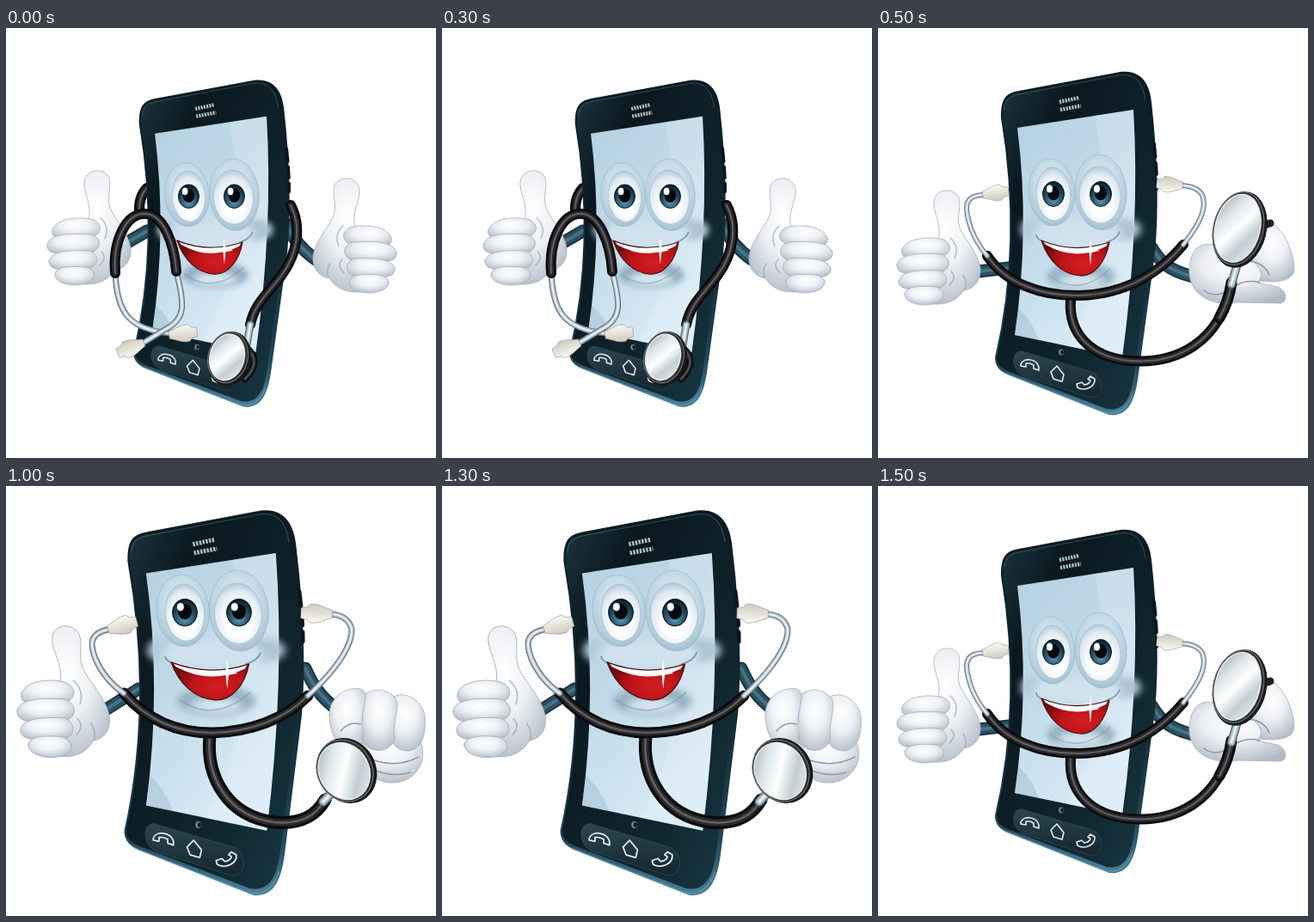
Recreate the animation shown at these times as an HTML page. Size 500x500 px, loop 2 s.

```html
<!DOCTYPE html>
<html lang="en">
<head>
<meta charset="utf-8">
<title>Phone doctor</title>
<style>
html, body { margin: 0; width: 100%; height: 100%; overflow: hidden; background: #fff; }
svg { display: block; width: 100%; height: 100%; }
.pose { display: none; }
.pose.on { display: inline; }
path, ellipse { stroke-linecap: round; stroke-linejoin: round; }
.line { fill: none; }
.grille { fill: none; stroke: #b4bbc0; stroke-width: 4.5; stroke-linecap: butt; stroke-dasharray: 2.2 1.2; }
.glove { fill: url(#glove); stroke: #a7b0bb; stroke-width: .8; }
.crease { fill: none; stroke: #8f9aa8; stroke-width: 1.5; }
</style>
</head>
<body>
<svg id="stage" viewBox="0 0 500 500">
<defs>
  <linearGradient id="body" x1="0" y1="0" x2="1" y2="1">
    <stop offset="0" stop-color="#1d3943"/><stop offset=".25" stop-color="#0a181f"/>
    <stop offset=".7" stop-color="#10262f"/><stop offset="1" stop-color="#193a47"/>
  </linearGradient>
  <linearGradient id="side" x1="0" y1="0" x2="0" y2="1">
    <stop offset="0" stop-color="#0b1a21"/><stop offset=".55" stop-color="#142b35"/>
    <stop offset=".85" stop-color="#214655"/><stop offset="1" stop-color="#4b8198"/>
  </linearGradient>
  <linearGradient id="glass" x1="0" y1="0" x2=".5" y2="1">
    <stop offset="0" stop-color="#b4d0e0"/><stop offset=".45" stop-color="#c0d9e7"/>
    <stop offset="1" stop-color="#d8ebf6"/>
  </linearGradient>
  <linearGradient id="bar" x1="0" y1="0" x2="0" y2="1">
    <stop offset="0" stop-color="#2c4651"/><stop offset="1" stop-color="#14262f"/>
  </linearGradient>
  <radialGradient id="socket" cx=".5" cy=".4" r=".62">
    <stop offset=".5" stop-color="#cadfeb"/><stop offset=".85" stop-color="#b2cbd9"/>
    <stop offset="1" stop-color="#9cb9ca"/>
  </radialGradient>
  <radialGradient id="eye" cx=".5" cy=".62" r=".65">
    <stop offset=".4" stop-color="#fff"/><stop offset=".75" stop-color="#dfebf2"/>
    <stop offset="1" stop-color="#a9c1d0"/>
  </radialGradient>
  <radialGradient id="iris" cx=".5" cy=".75" r=".7">
    <stop offset="0" stop-color="#6098b2"/><stop offset=".55" stop-color="#25526a"/>
    <stop offset="1" stop-color="#0a202c"/>
  </radialGradient>
  <radialGradient id="mouth" cx=".6" cy=".6" r=".55">
    <stop offset="0" stop-color="#d41d22"/><stop offset=".55" stop-color="#bd1418"/>
    <stop offset="1" stop-color="#6b0a0e"/>
  </radialGradient>
  <radialGradient id="glove" cx=".48" cy=".34" r=".72">
    <stop offset="0" stop-color="#fff"/><stop offset=".45" stop-color="#eef1f4"/>
    <stop offset="1" stop-color="#afb9c5"/>
  </radialGradient>
  <linearGradient id="steel" x1="0" y1="0" x2="1" y2="1">
    <stop offset="0" stop-color="#8f9ea6"/><stop offset=".3" stop-color="#dfe7ea"/>
    <stop offset=".5" stop-color="#fff"/><stop offset=".7" stop-color="#c3ced3"/>
    <stop offset="1" stop-color="#eef2f3"/>
  </linearGradient>
  <linearGradient id="tip" x1="0" y1="0" x2="0" y2="1">
    <stop offset="0" stop-color="#fbfaf3"/><stop offset="1" stop-color="#cdcabd"/>
  </linearGradient>
  <filter id="soft" x="-50%" y="-50%" width="200%" height="200%"><feGaussianBlur stdDeviation="4"/></filter>
  <clipPath id="smile"><path d="M190 247Q228 263 269 249C265 272 251 289 235 288C215 287 198 271 190 247Z"/></clipPath>

  <g id="phone">
    <path fill="url(#side)" d="M143 104C143 82 148 76 164 73L282 51C305 48 316 64 318 86Q329 185 322 262L303 402C299 434 291 452 269 450L156 405C141 400 136 393 136 383Q167 250 143 104Z"/>
    <path fill="url(#body)" d="M145 104C145 85 149 79 164 76L280 54C301 51 310 66 312 88Q322 190 317 262L298 402C294 432 286 446 266 443L154 400C141 395 138 391 138 382Q169 250 145 104Z"/>
    <path class="line" stroke="#527c8d" stroke-width="1" opacity=".5" d="M147 94C148 83 153 79 164 77L280 55C300 52 308 64 311 84"/>
    <path class="line" stroke="#6297ad" stroke-width="1.500" d="M147 401L264 447C280 451 290 442 296 426" opacity=".75"/>
    <path class="line" stroke="#0a161c" stroke-width="4" d="M321 135l1.500 15M323 157l.8 13M324 177v10"/>
    <path fill="url(#glass)" d="M162 116L297 95Q305 230 284 383L159 357Q177 235 162 116Z"/>
    <path fill="#fff" opacity=".16" d="M252 102L297 95Q305 230 284 383L220 370Q282 260 252 102Z"/>
    <path fill="#86a7b9" opacity=".3" d="M159 357L163 326Q178 338 187 363Z"/>
    <path class="grille" d="M211 86L234 81M212 95L236 90.500"/>
    <path fill="url(#bar)" stroke="#304c58" stroke-width=".7" d="M168 376L249 400C264 405 264 432 245 429L170 405C154 399 154 374 168 376Z"/>
    <g class="line" stroke="#e2eaed" stroke-width="1.600">
      <path d="M166 391C169 383 184 384 187 394L187 398L181 396V392Q176 389 172 390V394L166 393Z"/>
      <path d="M201 400L208 393L216 403L214 411L204 408Z"/>
      <path d="M247 405L252 408C253 417 241 423 232 418L231 414L237 412L240 415Q246 414 247 410L244 408Z"/>
    </g>
    <ellipse cx="213" cy="377" rx="3" ry="3.500" fill="#6d8894"/>
    <ellipse cx="214" cy="377" rx="1.800" ry="2.500" fill="#0a161c"/>
  </g>

  <g id="face">
    <g filter="url(#soft)">
      <ellipse cx="284" cy="234" rx="22" ry="13" fill="#aec4d1"/>
      <ellipse cx="178" cy="234" rx="12" ry="12" fill="#b2cad8"/>
      <ellipse cx="236" cy="289" rx="40" ry="16" fill="#94b1c2"/>
      <ellipse cx="232" cy="238" rx="52" ry="15" fill="#cfe2ed"/>
      <ellipse cx="236" cy="294" rx="26" ry="7" fill="#d9e8f1"/>
    </g>
    <path class="line" stroke="#7f9cae" stroke-width="1.500" d="M199 288Q234 314 270 280" opacity=".55"/>
    <g stroke="#9db8c8" stroke-width=".6">
      <ellipse cx="202" cy="191" rx="27" ry="39" fill="url(#socket)" transform="rotate(-4 202 191)"/>
      <ellipse cx="259" cy="191" rx="30" ry="44" fill="url(#socket)" transform="rotate(-4 259 191)"/>
      <ellipse cx="204" cy="193" rx="20" ry="31" fill="url(#eye)" transform="rotate(-4 204 193)"/>
      <ellipse cx="258" cy="194" rx="24" ry="33" fill="url(#eye)" transform="rotate(-4 258 194)"/>
    </g>
    <g id="pupil">
      <ellipse cx="204" cy="193" rx="12.500" ry="14.500" fill="url(#iris)" stroke="#071820"/>
      <ellipse cx="204" cy="192" rx="7" ry="8.500" fill="#03090d"/>
      <ellipse cx="199.500" cy="187" rx="3.500" ry="4.500" fill="#fff"/>
    </g>
    <use href="#pupil" x="55"/>
    <path class="line" stroke="#7d9bad" stroke-width="1.800" d="M184 241Q186 247 192 248M266 249Q277 246 281 237"/>
    <g clip-path="url(#smile)">
      <path fill="url(#mouth)" d="M185 240H275V295H185Z"/>
      <path fill="#fff" d="M190 245H270L265 254Q230 272 195 252Z"/>
    </g>
    <path class="line" stroke="#48121a" stroke-width="1.200" d="M190 247Q228 263 269 249C265 272 251 289 235 288C215 287 198 271 190 247Z"/>
    <path fill="#fff" d="M247 243L248.500 257L258 259L248.500 261L247 276L245.500 261L236 259L245.500 257Z"/>
  </g>

  <g id="thumb">
    <path class="glove" d="M69 248C76 232 64 216 65 202C67 186 88 185 94 197C97 208 91 220 95 232C100 245 116 260 119 279C120 294 112 303 100 305C90 320 74 323 58 320L42 304L46 256Z"/>
    <path class="glove" d="M28 258C31 245 58 241 76 246C87 251 85 263 75 265L46 268C32 269 26 265 28 258Z"/>
    <path class="glove" d="M22 275C24 263 48 261 73 263C86 267 85 281 73 284L40 286C27 286 21 282 22 275Z"/>
    <path class="glove" d="M24 294C26 282 50 281 71 282C83 286 82 300 71 302L42 304C29 304 23 300 24 294Z"/>
    <path class="glove" d="M31 309C33 299 52 300 67 301C79 304 79 315 69 319C58 325 30 322 31 309Z"/>
    <path class="crease" d="M84 244Q95 254 89 268M85 283Q92 290 83 299M101 304Q104 295 99 288" opacity=".6"/>
  </g>
</defs>
</svg>
<script>
const stroke = (d, color, width) =>
  `<path class="line" d="${d}" stroke="${color}" stroke-width="${width}"/>`;
const layers = (d, ...coats) => coats.map(([color, width]) => stroke(d, color, width)).join('');

const tube = (d, w = 12) => layers(d, ['#0b0b0c', w], ['#2b2b2d', w * .55], ['#626266', w * .16]);
const rod = (d, w = 6) => layers(d, ['#63747f', w], ['#b4c3cc', w * .68], ['#f0f5f7', w * .25]);
const arm = d => layers(d, ['#1a3542', 15], ['#2b5061', 11], ['#477286', 4]);
const put = (id, m = '') => `<use href="#${id}" transform="${m}"/>`;
const glove = d => `<path class="glove" d="${d}"/>`;
const crease = d => `<path class="crease" d="${d}"/>`;

const tip = (x, y, turn, size = 1) => `
  <path transform="translate(${x} ${y}) rotate(${turn}) scale(${size})" fill="url(#tip)" stroke="#a09d91" stroke-width=".6"
    d="M0 -4C8 -6 13 -10 21 -9L24 -6L30 -5V5L24 6L21 9C13 10 8 6 0 4Z"/>`;

const disc = (x, y, rx, ry, turn) => `
  <g transform="translate(${x} ${y}) rotate(${turn})">
    <ellipse cx="2" cy="1" rx="${rx}" ry="${ry}" fill="#19191b"/>
    <ellipse rx="${rx - 2}" ry="${ry - 2}" fill="#303033" stroke="#77777c"/>
    <ellipse cx="-1" rx="${rx - 5}" ry="${ry - 5}" fill="url(#steel)" stroke="#e5eaec" stroke-width="1.500"/>
  </g>`;

const resting = [
  tube('M164 186Q154 196 155 214'),
  arm('M138 251L164 236'),
  arm('M326 228C334 246 344 258 360 269'),
  put('phone', 'matrix(.963 0 0 .952 17 12.2)'),
  put('face', 'matrix(.963 0 0 .952 16 12)'),
  put('thumb', 'translate(26 -23)'),
  put('thumb', 'matrix(-1 0 0 1 476 -14)'),
  rod('M127 285C129 329 141 350 190 355', 7),
  rod('M198 283C208 322 209 338 186 350L158 367', 7),
  tip(160, 366, 158, 1.08), tip(190, 357, -6, 1.08),
  tube('M127 285C124 248 139 216 161 216C184 216 196 253 198 283'),
  tube('M331 206C344 231 339 263 320 288C302 312 289 321 284 345'),
  rod('M284 345L279 374', 9),
  tube('M280 372Q298 388 278 408', 8),
  disc(258, 383, 25, 32, 14)
];

const listening = [
  arm('M108 284L152 279'),
  arm('M318 255C328 272 338 282 366 289'),
  put('phone'), put('face'), put('thumb'),
  tube('M224 316C221 357 249 383 293 387C345 391 398 368 411 296'),
  tube('M127 265C148 296 188 312 235 311C290 309 329 283 355 252'),
  rod('M122 194C98 195 101 211 108 233Q115 251 127 265'),
  rod('M355 252C378 223 382 207 377 194Q371 184 353 183'),
  tip(122, 194, -8), tip(354, 183, 184),
  glove('M432 258C432 236 446 219 462 230C476 242 484 265 484 281C482 296 459 297 437 293Z'),
  glove('M364 268C369 249 388 246 400 260L430 268C446 277 450 289 440 296L465 301C477 307 476 320 467 320L418 319C399 323 382 318 371 307C361 296 360 282 364 268Z'),
  crease('M427 271Q448 271 455 287M417 299Q430 292 444 296M379 305Q389 313 402 308'),
  tube('M411 296Q408 318 397 337', 13),
  rod('M420 267L411 298', 10),
  stroke('M446 230L456 227', '#222225', 9),
  disc(419, 233, 31, 45, 14)
];

const examining = [
  arm('M116 260L154 236'),
  arm('M348 212C356 230 364 244 385 260'),
  put('phone', 'matrix(1.12 0 .014 1.121 -20.2 -28.6)'),
  put('face', 'matrix(1.145 0 0 1.07 -25.6 -59.4)'),
  put('thumb', 'matrix(1.1 0 .09 1.148 -36 -54)'),
  tube('M237 290C232 339 258 384 312 391C345 394 361 382 371 365', 15),
  tube('M137 241C165 273 201 287 239 287C285 286 324 271 351 244', 13),
  rod('M118 167C96 172 98 185 104 201Q115 226 137 241', 7),
  rod('M351 244C391 207 403 181 402 166Q397 150 378 149', 7),
  tip(119, 167, -16, 1.15), tip(379, 149, 182, 1.2),
  glove('M420 293C423 273 481 282 484 304C489 328 469 346 448 345C431 346 414 328 408 309Z'),
  glove('M446 249C459 234 485 248 487 268C489 287 484 305 469 308C452 309 441 293 443 271Z'),
  glove('M414 246C425 231 450 236 455 252C455 266 449 280 452 294C447 309 428 312 416 300Z'),
  glove('M376 266C376 245 396 233 412 236C426 241 411 260 414 284C418 301 411 313 399 308C382 300 376 284 376 266Z'),
  crease('M417 314Q449 331 480 315M423 328Q448 340 470 333M389 285Q399 273 412 277'),
  rod('M385 350L369 367', 11),
  disc(394, 331, 34, 39, -28)
];

const stage = document.getElementById('stage');
const poses = [resting, listening, examining].map(parts => {
  const g = document.createElementNS(stage.namespaceURI, 'g');
  g.setAttribute('class', 'pose');
  g.innerHTML = parts.join('');
  return stage.appendChild(g);
});

const order = [0, 1, 2, 1];
const hold = 500;
const start = performance.now();

function draw(now) {
  const step = Math.floor(Math.max(0, now - start) / hold) % order.length;
  poses.forEach((g, i) => g.classList.toggle('on', i === order[step]));
  requestAnimationFrame(draw);
}
draw(start);
</script>
</body>
</html>
```
